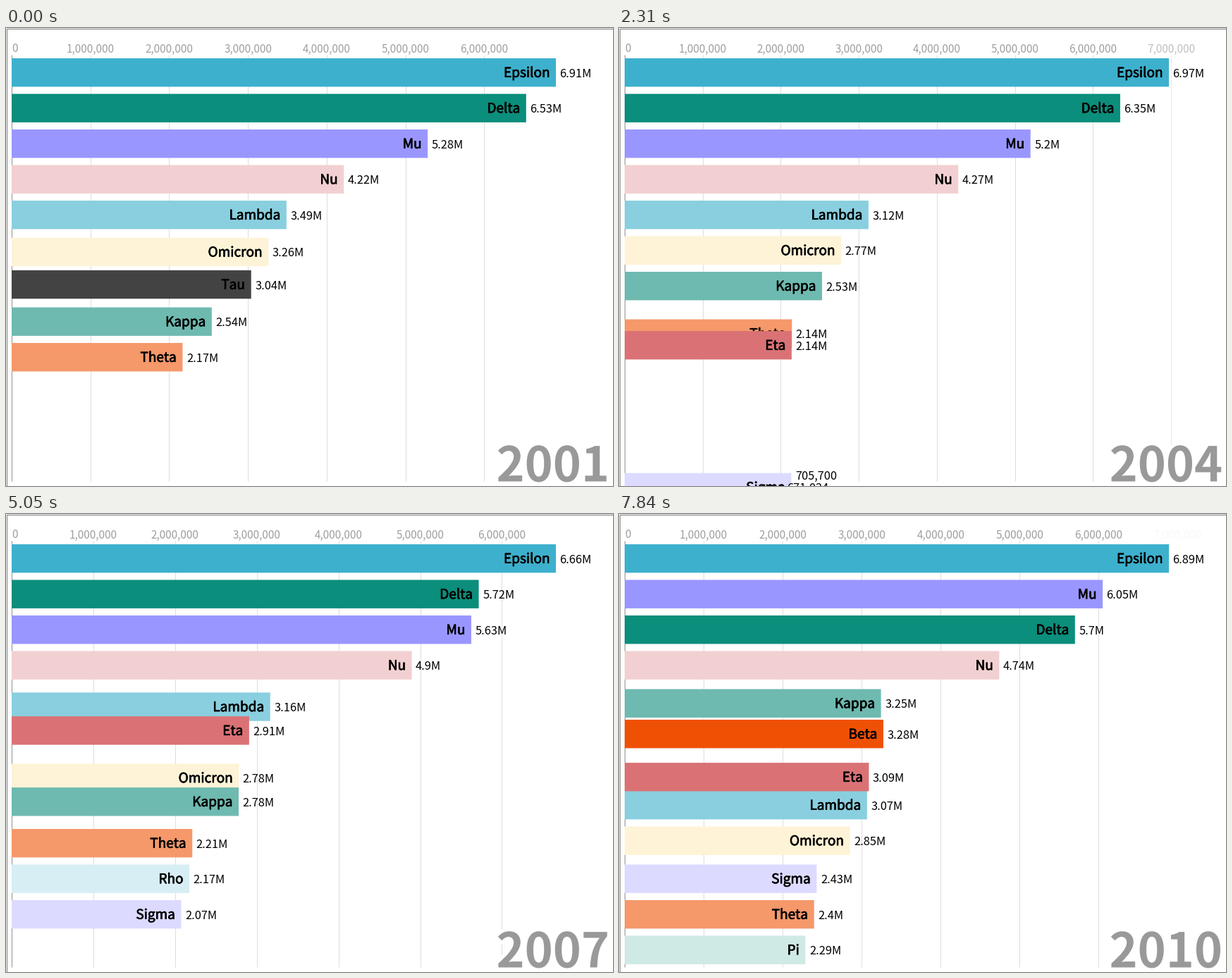
Animation, 861 px wide and 650 px high, one loop 7990 ms. Source, as a matplotlib script:

```python
import numpy as np
import matplotlib.pyplot as plt
from matplotlib.animation import FuncAnimation
from matplotlib.patches import Rectangle
from matplotlib.patheffects import withStroke

W, H, DPI = 861, 650, 64
PT = 72 / DPI                      # points per pixel
LOOP, INTERVAL = 7990, 34
STEP_MS, LAST_STEP = 135, 58       # the picture is refreshed once per step
X0, SPAN = 8, 772                  # bar origin and width of the longest bar
TOP, PITCH, BAR_H = 43, 50.5, 40.4
OFF_RANK = 13                      # bars enter from and leave to this row
LABEL_SHIFT = 26.3
YEARS = range(11)                  # counted from 2000
BENDS = (0, 3, 5, 6, 8, 10)        # years where the trends change direction

plt.rcParams["font.family"] = ["Noto Sans CJK JP", "DejaVu Sans"]


def trend(*values, years=None):
    """Yearly millions, linear between key years; 0 means not ranked."""
    years = years or BENDS[-len(values):]
    return np.interp(YEARS, years, values, left=0, right=0)


# name: (colour, layer, yearly values)
SERIES = {
    "Epsilon": ("#3db0cd", 0, trend(6.854, 7.03, 6.69, 6.66, 6.67, 7.08)),
    "Delta": ("#0b8e7c", 0, trend(6.58, 6.43, 5.95, 5.7, 5.9, 5.526)),
    "Mu": ("#9997ff", 0, trend(5.34, 5.16, 5.39, 5.6, 5.903, 6.18)),
    "Lambda": ("#89cfdf", 0, trend(3.705, 3.03, 3.58, 3.17, 3.1, 3.04)),
    "Nu": ("#f2d0d1", 0, trend(4.23, 4.19, 4.68, 4.86, 5.31, 4.245)),
    "Tau": ("#434343", 0, trend(3.5, 3.02, 2.07, years=(0, 1, 2))),
    "Omicron": ("#fef3d6", 0, trend(3.475, 2.8, 2.645, 2.77, 2.9, 2.81)),
    "Kappa": ("#6ebab0", 0, trend(2.55, 2.52, 2.57, 2.75, 3.09, 3.38)),
    "Beta": ("#ef5104", 0, trend(2.558, 3.9)),
    "Theta": ("#f5986a", 0, trend(2.175, 2.16, 2.06, 2.18, 2.556, 2.26)),
    "Eta": ("#da7275", 1, trend(2.069209, 2.48, 2.86, 3.42, 2.805)),
    "Rho": ("#d7eef4", 2, trend(1.997095, 1.998, 2.3, years=(4, 5, 7))),
    "Sigma": ("#dcdaff", 2, trend(2.100298, years=(4,)) + trend(2.05, 2.35, 2.5)),
    "Xi": ("#f3d2cf", 3, trend(2.33, years=(8,))),
    "Pi": ("#cfe9e5", 4, trend(2.29, 2.25, years=(9, 10))),
}
VALUES = {name: values for name, (_, _, values) in SERIES.items()}
PEAK = VALUES["Epsilon"]


def ranking(year):
    ranked = [name for name in SERIES if VALUES[name][year] > 0]
    ranked.sort(key=lambda name: -VALUES[name][year])
    return {name: rank for rank, name in enumerate(ranked)}


RANKS = [ranking(year) for year in YEARS]


def phase_at(step):
    """Years passed since 2000; the pace wavers slightly."""
    return np.interp(step, (0, 10, 17, 50, 58), (0.957, 2.407, 3.336, 8.005, 9.07))


def mix(a, b, f):
    return a + (b - a) * f


def x_at(value, year):
    return X0 + SPAN * value / PEAK[year]


def row_y(rank):
    return TOP + PITCH * rank


def short(value):
    if value < 1:
        return f"{round(value * 1e6):,}"
    return f"{value:.2f}".rstrip("0").rstrip(".") + "M"


fig = plt.figure(figsize=(W / DPI, H / DPI), dpi=DPI, facecolor="white")
ax = fig.add_axes([0, 0, 1, 1])
ax.set(xlim=(0, W), ylim=(H, 0))
ax.axis("off")


def text(x, y, s, px, **style):
    return ax.text(x, y, s, fontsize=px * PT, va="baseline", **style)


def outline(px, color):
    return [withStroke(linewidth=px * PT, foreground=color)]


def grid_line(color):
    return ax.plot([7.5, 7.5], [38, 643], color=color, lw=PT, zorder=1,
                   solid_capstyle="butt")[0]


def tick_label(s, align):
    return text(X0, 34.5, s, 15.2, color="#a0a0a0", ha=align)


grid_line("#909090")
tick_label("0", "left")
ticks = [(m, grid_line("#dddddd"), tick_label(f"{m},000,000", "center"))
         for m in range(1, 8)]

year_text = text(856, 643.5, "", 68, color="#999999", weight="bold", ha="right",
                 zorder=2, path_effects=outline(10, "white"))

rows = {}
for order, (name, (color, layer, _)) in enumerate(SERIES.items()):
    z = 10 + 10 * layer
    bar = Rectangle((X0, 0), 0, BAR_H, fc=color, lw=0, snap=False, zorder=z + order / 100)
    ax.add_patch(bar)
    # a thin outline gives the regular face a semibold weight
    label = text(0, 0, name, 19, color="black", ha="right", zorder=z + 1,
                 path_effects=outline(0.7, "black"))
    amount = text(0, 0, "", 16.4, color="black", ha="left", zorder=z + 2)
    rows[name] = bar, label, amount

ax.plot([W, 0.5, 0.5, W], [0.5, 0.5, H - 0.5, H - 0.5], color="#777777", lw=PT,
        solid_joinstyle="miter", zorder=100)


def place_row(name, year, f):
    """Pose one bar on its way from `year` to the next."""
    old, new = RANKS[year].get(name), RANKS[year + 1].get(name)
    shown = old is not None or new is not None
    for artist in rows[name]:
        artist.set_visible(shown)
    if not shown:
        return
    bar, label, amount = rows[name]
    v0, v1 = VALUES[name][year:year + 2]
    label_dy = amount_dy = 0
    if old is None:
        old, x, value = OFF_RANK, x_at(v1, year + 1), v1 * f
        amount_dy = -LABEL_SHIFT * (1 - f)
    elif new is None:
        new, x, value = OFF_RANK, mix(x_at(v0, year), x_at(v0, year + 1), f), v0
        label_dy = amount_dy = -LABEL_SHIFT * f
    else:
        x = mix(x_at(v0, year), x_at(v1, year + 1), f)
        value = mix(v0, v1, f)
    y = mix(row_y(old), row_y(new), f)
    bar.set_y(y)
    bar.set_width(x - X0)
    label.set_position((x - 8.5, y + 26.7 + label_dy))
    amount.set_position((x + 5.5, y + 26.7 + amount_dy))
    amount.set_text(short(value))


def place_tick(m, line, label, year, f):
    x = mix(x_at(m, year), x_at(m, year + 1), f)
    alpha = mix(float(m <= PEAK[year]), float(m <= PEAK[year + 1]), f)
    line.set_xdata([x, x])
    label.set_x(x)
    for artist in (line, label):
        artist.set_alpha(alpha)
        artist.set_visible(alpha > 0)


def update(i):
    now = i * INTERVAL + INTERVAL - 1
    phase = phase_at(min(now // STEP_MS, LAST_STEP))
    year = int(phase)
    f = phase - year
    year_text.set_text(str(2001 + year))
    for tick in ticks:
        place_tick(*tick, year, f)
    for name in rows:
        place_row(name, year, f)
    return []


anim = FuncAnimation(fig, update, frames=LOOP // INTERVAL, interval=INTERVAL,
                     repeat=True, repeat_delay=0, blit=False)
plt.show()
```
